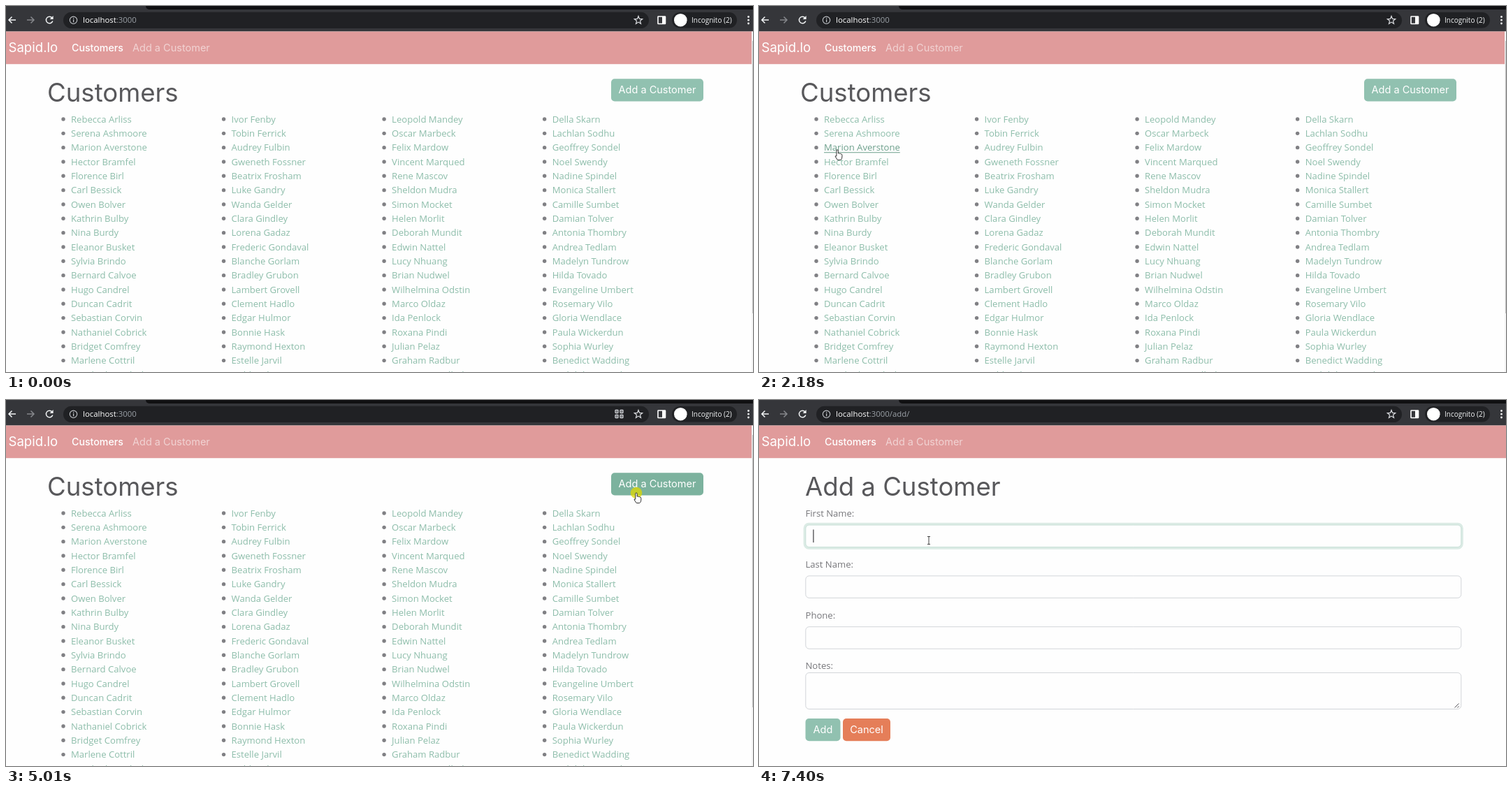
These frames come from a looping animation (1069 by 524 pixels, 8000 ms). An HTML page with a canvas:

```html
<!DOCTYPE html>
<html lang="en">
<head>
<meta charset="utf-8">
<title>Customer list</title>
<style>
html, body { margin: 0; width: 100%; height: 100%; overflow: hidden; background: #fefefe; }
canvas { display: block; width: 100vw; height: 100vh; }
</style>
</head>
<body>
<canvas id="stage" width="1069" height="524"></canvas>
<script>
const ctx = document.getElementById('stage').getContext('2d');
const LOOP = 8000;
const DISPLAY = 'Inter, sans-serif';
const BODY = '"Open Sans", "Noto Sans", sans-serif';
const LINK_FONT = `13.1px ${BODY}`;
const GREEN = '#91c1b0', GREEN_HOVER = '#7cb29e', ORANGE = '#e57e59';

const columns = [
  'Rebecca Arliss,Serena Ashmoore,Marion Averstone,Hector Bramfel,Florence Birl,Carl Bessick,Owen Bolver,Kathrin Bulby,Nina Burdy,Eleanor Busket,Sylvia Brindo,Bernard Calvoe,Hugo Candrel,Duncan Cadrit,Sebastian Corvin,Nathaniel Cobrick,Bridget Comfrey,Marlene Cottril,Rosalind Cumbril',
  'Ivor Fenby,Tobin Ferrick,Audrey Fulbin,Gweneth Fossner,Beatrix Frosham,Luke Gandry,Wanda Gelder,Clara Gindley,Lorena Gadaz,Frederic Gondaval,Blanche Gorlam,Bradley Grubon,Lambert Grovell,Clement Hadlo,Edgar Hulmor,Bonnie Hask,Raymond Hexton,Estelle Jarvil,Nelda Jubrin',
  'Leopold Mandey,Oscar Marbeck,Felix Mardow,Vincent Marqued,Rene Mascov,Sheldon Mudra,Simon Mocket,Helen Morlit,Deborah Mundit,Edwin Nattel,Lucy Nhuang,Brian Nudwel,Wilhelmina Odstin,Marco Oldaz,Ida Penlock,Roxana Pindi,Julian Pelaz,Graham Radbur,Maurice Rendholm',
  'Della Skarn,Lachlan Sodhu,Geoffrey Sondel,Noel Swendy,Nadine Spindel,Monica Stallert,Camille Sumbet,Damian Tolver,Antonia Thombry,Andrea Tedlam,Madelyn Tundrow,Hilda Tovado,Evangeline Umbert,Rosemary Vilo,Gloria Wendlace,Paula Wickerdun,Sophia Wurley,Benedict Wadding,Rudolph Wynnel'
].map(names => names.split(','));

// Event times in ms
const FOCUS_URL = 3060, BLUR_URL = 5010, PAGE_SWITCH = 5200, FOCUS_FIELD = 6370;
const clicks = [[2990, 3110], [5010, 5120], [6340, 6460]];

// Pointer path: time, x, y
const path = [
  [100, 885, 512], [500, 470, 428], [890, 120, 337], [960, 120, 337],
  [1170, 108, 279], [1390, 108, 279], [1560, 82, 200], [1680, 84, 113],
  [1850, 112, 206], [2180, 112, 206], [2790, 211, 30], [3060, 211, 30],
  [3790, 830, 200], [3850, 830, 200], [4130, 902, 133], [5060, 902, 133],
  [5270, 754, 249], [5750, 420, 290], [5820, 420, 290], [6300, 232, 197],
  [6670, 232, 197], [6870, 243, 201], [8000, 243, 201]
];

const shapes = {
  hand: new Path2D('M-1.2 1.2a1.2 1.2 0 0 1 2.4 0v4q1.3-.8 2 .4 1.5-.6 2 .6 1.6-.4 1.6 1.4v2.6q0 3-2 4.3h-4.6l-3-4.5q-.8-1.8 1.6-.8z'),
  arrow: new Path2D('M0 0V9.5l2.2-2 1.6 3.5 1.6-.7-1.6-3.4H7z'),
  beam: new Path2D('M-2-5.5h4M0-5.5V5.5M-2 5.5h4')
};

const clamp = v => Math.max(0, Math.min(1, v));
const inside = (p, x, y, w, h) => p.x >= x && p.x <= x + w && p.y >= y && p.y <= y + h;

function pointerAt(t) {
  if (t < path[0][0]) return null;
  const i = path.findIndex(k => k[0] > t);
  const [t0, x0, y0] = path[i - 1], [t1, x1, y1] = path[i];
  const u = (t - t0) / (t1 - t0);
  const e = u * .6 + u * u * (3 - 2 * u) * .4;
  return { x: x0 + (x1 - x0) * e, y: y0 + (y1 - y0) * e };
}

function text(str, x, y, font, color, align = 'left') {
  ctx.font = font;
  ctx.fillStyle = color;
  ctx.textAlign = align;
  ctx.fillText(str, x, y);
}

function rect(x, y, w, h, color) {
  ctx.fillStyle = color;
  ctx.fillRect(x, y, w, h);
}

function round(x, y, w, h, r, fill, stroke, line = 1) {
  ctx.beginPath();
  ctx.roundRect(x, y, w, h, r);
  if (fill) { ctx.fillStyle = fill; ctx.fill(); }
  if (stroke) { ctx.strokeStyle = stroke; ctx.lineWidth = line; ctx.stroke(); }
}

function circle(x, y, r, color) {
  ctx.fillStyle = color;
  ctx.beginPath();
  ctx.arc(x, y, r, 0, Math.PI * 2);
  ctx.fill();
}

function strokePath(d, color, width = 1.5) {
  ctx.strokeStyle = color;
  ctx.lineWidth = width;
  ctx.stroke(new Path2D(d));
}

function button(label, x, y, w, color, k = 1) {
  ctx.globalAlpha = .8 + .2 * k;
  round(x, y, w, 32.3, 5, color);
  ctx.globalAlpha = .5 + .5 * k;
  text(label, x + w / 2, y + 20.8, `14.5px ${DISPLAY}`, '#fff', 'center');
  ctx.globalAlpha = 1;
}

function drawStar(x, y) {
  ctx.beginPath();
  for (let i = 0; i < 10; i++) {
    const a = i * Math.PI / 5 - Math.PI / 2, r = i % 2 ? 2.6 : 6;
    ctx.lineTo(x + Math.cos(a) * r, y + Math.sin(a) * r);
  }
  ctx.closePath();
  ctx.strokeStyle = '#dadce0';
  ctx.lineWidth = 1.2;
  ctx.stroke();
}

function drawToolbar(t) {
  const focused = t >= FOCUS_URL && t < BLUR_URL;
  rect(0, 0, 1069, 36.5, '#35363a');
  round(200, -6, 880, 11, 5, '#101012');
  strokePath('M14 20H4M8.5 15.5L4 20l4.5 4.5', '#f1f3f4');
  strokePath('M30 20h10M35.5 15.5L40 20l-4.5 4.5', '#85878b');
  strokePath('M66 17a4.8 4.8 0 1 0 .8 4.5', '#f1f3f4');
  ctx.fillStyle = '#f1f3f4';
  ctx.fill(new Path2D('M67.6 14v5h-5z'));

  round(82, 8.7, 838, 23.4, 11.7, '#202124', focused ? '#a3c4f5' : null, 2);
  ctx.beginPath();
  ctx.arc(96.5, 20.3, 5.2, 0, Math.PI * 2);
  ctx.strokeStyle = '#c4c7cb';
  ctx.lineWidth = 1.1;
  ctx.stroke();
  rect(96, 19.3, 1.2, 4, '#c4c7cb');
  rect(96, 17, 1.2, 1.3, '#c4c7cb');

  const font = `11.4px ${BODY}`;
  ctx.font = font;
  ctx.textAlign = 'left';
  const hostWidth = ctx.measureText('localhost').width;
  const tail = t >= PAGE_SWITCH ? ':3000/add/' : ':3000';
  if (focused) rect(110, 11, hostWidth + ctx.measureText(tail).width, 18.5, '#6f8fbd');
  text('localhost', 110, 24.3, font, '#fff');
  text(tail, 110 + hostWidth, 24.3, font, focused ? '#fff' : '#9aa0a6');

  if (t >= FOCUS_URL && t < PAGE_SWITCH) {
    for (const [x, y] of [[872, 14.5], [879, 14.5], [872, 21.5], [879, 21.5]]) {
      round(x, y, 4, 4, .5, null, '#cfd2d6', 1.3);
      rect(x + 1.3, y + 1.3, 1.4, 1.4, '#cfd2d6');
    }
  }
  drawStar(905, 20.5);
  round(933, 15, 10.5, 10.5, .5, null, '#fff', 1.6);
  rect(939, 15, 5, 10.5, '#fff');
  round(953, 9, 93, 22.5, 11.2, '#202124');
  circle(965.3, 20.2, 9.3, '#fff');
  text('Incognito (2)', 981, 23.8, `10px ${BODY}`, '#f1f3f4');
  for (const y of [15.5, 20.2, 25]) circle(1062.5, y, 1.4, '#f1f3f4');
}

function drawNavbar() {
  rect(0, 36.5, 1069, 46.7, '#e09b9b');
  text('Sapid.lo', 3.5, 66.2, `18.6px ${DISPLAY}`, '#fff');
  text('Customers', 94, 65, `500 14.2px ${DISPLAY}`, '#fff');
  text('Add a Customer', 181, 65, `14.5px ${DISPLAY}`, 'rgba(255,255,255,.56)');
}

function title(str, x) {
  text(str, x, 136.5, `36.6px ${DISPLAY}`, '#58585b');
}

// Each page returns the pointer shape for the current position.
function drawList(p) {
  let shape = 'arrow';
  title('Customers', 59);
  if (p && inside(p, 60, 104, 185, 42)) shape = 'beam';
  const overButton = p && inside(p, 866, 104, 132, 32.3);
  if (overButton) shape = 'hand';
  button('Add a Customer', 866, 104.2, 132, overButton ? GREEN_HOVER : GREEN);

  columns.forEach((names, c) => names.forEach((name, r) => {
    const x = 93 + c * 229.55, y = 162 + r * 20.33;
    circle(x - 11, y, 2.7, '#808084');
    ctx.font = LINK_FONT;
    const w = ctx.measureText(name).width;
    const over = p && inside(p, x, y - 9, w, 18);
    const color = over ? '#6c9f8b' : '#8dbdaa';
    text(name, x, y + 4.8, LINK_FONT, color);
    if (over) {
      rect(x, y + 6.6, w, 1, color);
      shape = 'hand';
    }
  }));
  rect(1067, 36.5, 2, 488, '#f5f5f5');
  rect(1068, 50, 1, 390, '#c1c1c1');
  return shape;
}

function drawForm(t, p) {
  title('Add a Customer', 66);
  const focus = clamp((t - FOCUS_FIELD) / 150);
  let shape = 'arrow';
  ['First Name:', 'Last Name:', 'Phone:', 'Notes:'].forEach((label, i) => {
    const labelY = 162 + i * 72.85;
    const y = i < 3 ? labelY + 17 : 390.5, h = i < 3 ? 31.5 : 52;
    text(label, 66.5, labelY + 4.8, LINK_FONT, '#77777b');
    if (!i && focus) round(65.3, y - 1.5, 940.8, h + 3, 6, null, `rgba(145,193,176,${.33 * focus})`, 3.4);
    round(66.8, y, 938, h, 5, '#fefefe', !i && focus ? '#c8e0d7' : '#d2d5d9');
    if (inside(p, 66, y, 939, h)) shape = 'beam';
  });
  strokePath('M995.5 440.5l6-6M999.5 440.5l2-2', '#55555a', 1);

  const k = clamp((t - PAGE_SWITCH) / 200);
  button('Add', 66.5, 456, 50, GREEN, k);
  button('Cancel', 120, 456, 68, ORANGE, k);

  const caretOn = t >= FOCUS_FIELD && t < 6870 || t >= 7400;
  if (caretOn) rect(77.3, 185.5, 1.2, 18.5, '#3c3c40');
  return shape;
}

function drawPointer(p, shape) {
  ctx.save();
  ctx.translate(p.x, p.y);
  ctx.lineJoin = 'round';
  if (shape === 'beam') {
    ctx.strokeStyle = p.y < 36 ? '#5d5a18' : '#444';
  } else {
    ctx.fillStyle = '#fff';
    ctx.fill(shapes[shape]);
    ctx.strokeStyle = '#333';
  }
  ctx.lineWidth = 1;
  ctx.stroke(shapes[shape]);
  ctx.restore();
}

function draw(t) {
  const p = pointerAt(t);
  rect(0, 0, 1069, 524, '#fefefe');
  drawToolbar(t);
  drawNavbar();
  let shape = t < PAGE_SWITCH ? drawList(p) : drawForm(t, p);
  if (!p) return;
  if (inside(p, 82, 8, 838, 25)) shape = 'beam';
  if (clicks.some(([from, to]) => t >= from && t < to)) circle(p.x, p.y, 8.3, 'rgba(222,216,0,.75)');
  drawPointer(p, shape);
}

const start = performance.now();
function tick() {
  draw((performance.now() - start) % LOOP);
  requestAnimationFrame(tick);
}
tick();
</script>
</body>
</html>
```
